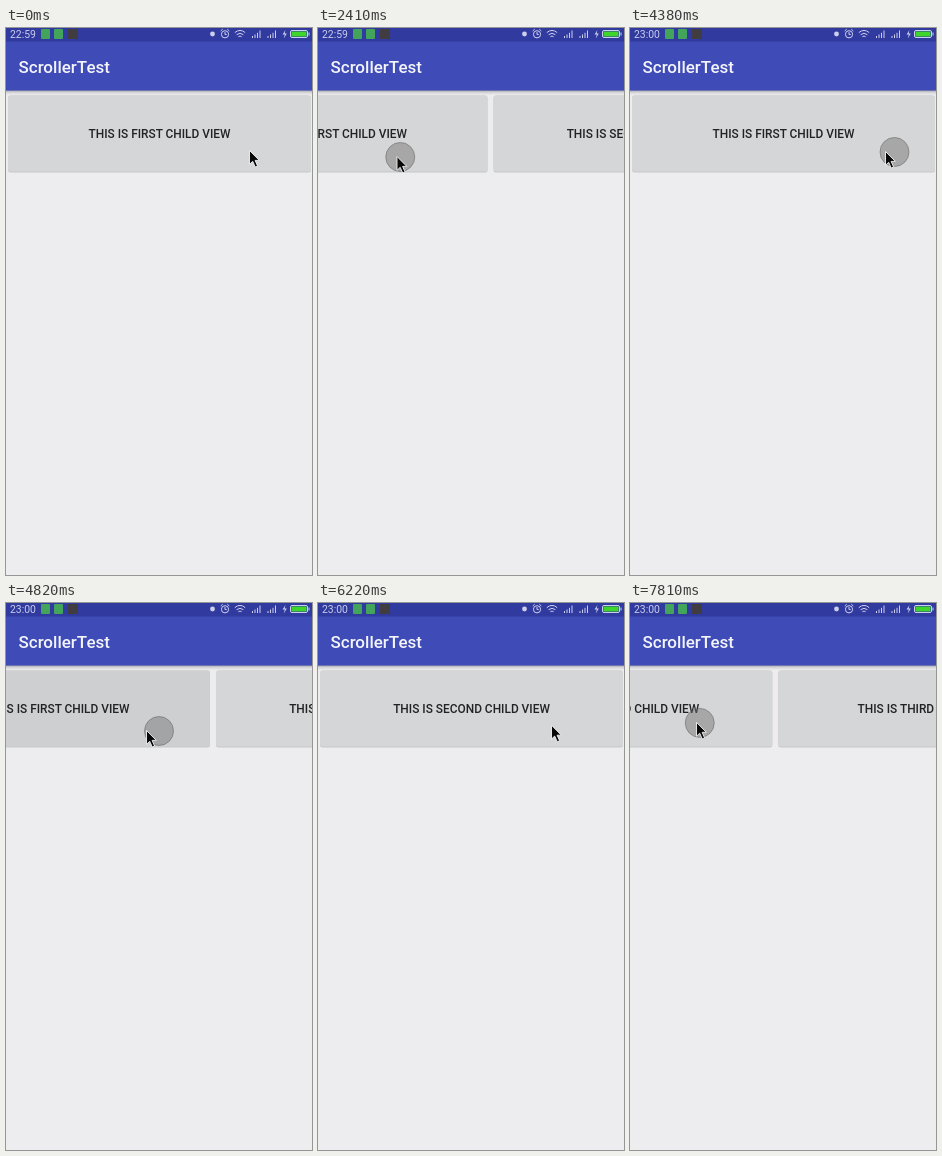
Write an HTML page that moves like this. It is 306 by 547 pixels and loops after 8 s.

```html
<!DOCTYPE html>
<html lang="en">
<head>
<meta charset="utf-8">
<title>ScrollerTest</title>
<style>
  html, body { margin: 0; width: 100%; height: 100%; overflow: hidden; background: #ededef; }
  svg { display: block; width: 100%; height: 100%; }
  text { font-family: Roboto, sans-serif; }
  .label { font-size: 11.9px; font-weight: 500; fill: #222324; text-anchor: middle; }
  .face { fill: #d5d6d8; }
  .press { fill: #b6b7b8; opacity: 0; }
  .icons { fill: none; stroke: #ccd0ee; stroke-width: 1; }
</style>
</head>
<body>
<svg viewBox="0 0 306 547">
  <defs>
    <linearGradient id="shade" x2="0" y2="1">
      <stop offset="0" stop-color="#8d8f9c"/>
      <stop offset=".4" stop-color="#cfd0d4"/>
      <stop offset="1" stop-color="#ededef"/>
    </linearGradient>
  </defs>
  <rect width="306" height="547" fill="#ededef"/>
  <rect y="62" width="306" height="5" fill="url(#shade)"/>
  <g id="pages"></g>

  <rect width="306" height="62.5" fill="#3f4bb6"/>
  <rect width="306" height="13.5" fill="#313b9f"/>
  <text x="12.5" y="45" font-size="17" font-weight="500" fill="#f4f5fb">ScrollerTest</text>
  <text id="clock" x="4" y="9.7" font-size="10.4" fill="#c9cdec">22:59</text>
  <rect x="35" y="1" width="9" height="10" rx="1" fill="#43a45c"/>
  <rect x="48" y="1" width="9" height="10" rx="1" fill="#43a45c"/>
  <rect x="62" y="1" width="10" height="10" fill="#403c40"/>
  <g class="icons">
    <circle cx="206.5" cy="6" r="2.4" fill="#ccd0ee" stroke="none"/>
    <circle cx="219" cy="6.3" r="3.6"/>
    <path d="M219 4v2.5h1.7M214.7 3l2-1.8M223.3 3l-2-1.8"/>
    <path d="M228.8 4.6q5.2-4.4 10.4 0M230.6 6.7q3.4-2.9 6.8 0M232.4 8.7q1.6-1.3 3.2 0"/>
    <g id="signal"><path d="M246.5 10V8M249 10V6.5M251.5 10V4.8M254 10V2.5"/></g>
    <use href="#signal" x="15.5"/>
    <path d="M279.5 2l-3 4.5h2.3l-1 4 3-5h-2.2z" fill="#ccd0ee" stroke="none"/>
    <rect x="284.5" y="2.5" width="17" height="7" rx="1.5"/>
    <rect x="286" y="4" width="14" height="4" fill="#3fd52c" stroke="#3fd52c"/>
    <path d="M303 4.5v3"/>
  </g>

  <circle id="touch" r="14.5" fill="#6e6e6e" fill-opacity=".45" stroke="#5c5c5c" stroke-opacity=".5"/>
  <path id="cursor" d="M.5 .5V14.3L3.7 11.3 6.2 17 8.6 16 6.1 10.4H10.3Z" fill="#080808" stroke="#f4f4f4" stroke-width=".9"/>
</svg>
<script>
const LOOP = 8000, STEP = 88.8, LAST_STEP = 89, PAGE = 309;
const $ = id => document.getElementById(id);

// Tracks hold [step, value] pairs, joined by straight lines.
const cursorX = [
  [9, 243], [18, 244], [20, 220], [24, 132], [26, 83], [27, 78.5], [31, 69], [38, 69], [44, 222],
  [47, 273], [48, 271], [49, 255], [54, 140], [57, 92], [59, 79], [61, 77.5], [64, 98],
  [69, 225], [73, 257], [75, 257], [78, 186], [79, 171.5], [82, 107], [85, 75], [87, 66]
];
const cursorY = [
  [5, 122], [6, 126], [18, 125], [27, 128], [38, 129], [47, 123],
  [49, 123], [54, 127], [62, 128], [71, 121], [79, 118], [88, 119]
];
const scrollX = [
  [18, 0], [21, 7], [24, 77], [27, 135.5], [31, 147], [33, 147], [35, 45], [37, 0],
  [49, 0], [51, 23], [54, 101], [57, 154], [60, 172.5], [61, 172.5], [63, 275], [65, PAGE],
  [76, PAGE], [79, 355.5], [82, 421], [85, 465], [88, 475]
];
const drags = [
  { page: 0, down: 17, up: 33 },
  { page: 0, down: 48, up: 61 },
  { page: 1, down: 74, up: LAST_STEP }
];

$("pages").innerHTML = ["FIRST", "SECOND", "THIRD"].map((name, i) => `
  <g transform="translate(${i * PAGE} 0)">
    <rect x="2" y="67.5" width="303" height="77" rx="2.5" fill="#c6c7c9"/>
    <rect class="face" x="2" y="67.5" width="303" height="76" rx="2.5"/>
    <rect class="press" x="2" y="67.5" width="303" height="76" rx="2.5"/>
    <text class="label" x="153.5" y="109.8">THIS IS ${name} CHILD VIEW</text>
  </g>`).join("");
const presses = document.querySelectorAll(".press");

function sample(track, step) {
  const next = track.findIndex(key => key[0] >= step);
  if (next < 0) return track[track.length - 1][1];
  if (next === 0) return track[0][1];
  const [s0, v0] = track[next - 1], [s1, v1] = track[next];
  return v0 + (v1 - v0) * (step - s0) / (s1 - s0);
}

const move = (id, x, y) => $(id).setAttribute("transform", `translate(${x} ${y})`);

// The pressed tint rises for two steps, then fades over five.
function pressLevel(age) {
  return Math.max(0, Math.min((age - 1) / 2, (8 - age) / 5)) * .6;
}

function draw(time) {
  const step = Math.min(LAST_STEP, Math.floor(time / STEP));
  const y = sample(cursorY, step);
  const drag = drags.find(d => step >= d.down && step <= d.up);
  move("pages", -sample(scrollX, step), 0);
  move("cursor", sample(cursorX, step), y);
  // The touch dot trails the cursor by half a step.
  move("touch", sample(cursorX, step - .5) + 1.5, y + 1);
  $("touch").style.display = drag ? "" : "none";
  $("clock").textContent = step < 30 ? "22:59" : "23:00";
  presses.forEach((press, page) => {
    press.style.opacity = drag && drag.page === page ? pressLevel(step - drag.down) : 0;
  });
}

const start = performance.now();
function tick() {
  draw((performance.now() - start) % LOOP);
  requestAnimationFrame(tick);
}
tick();
</script>
</body>
</html>
```
